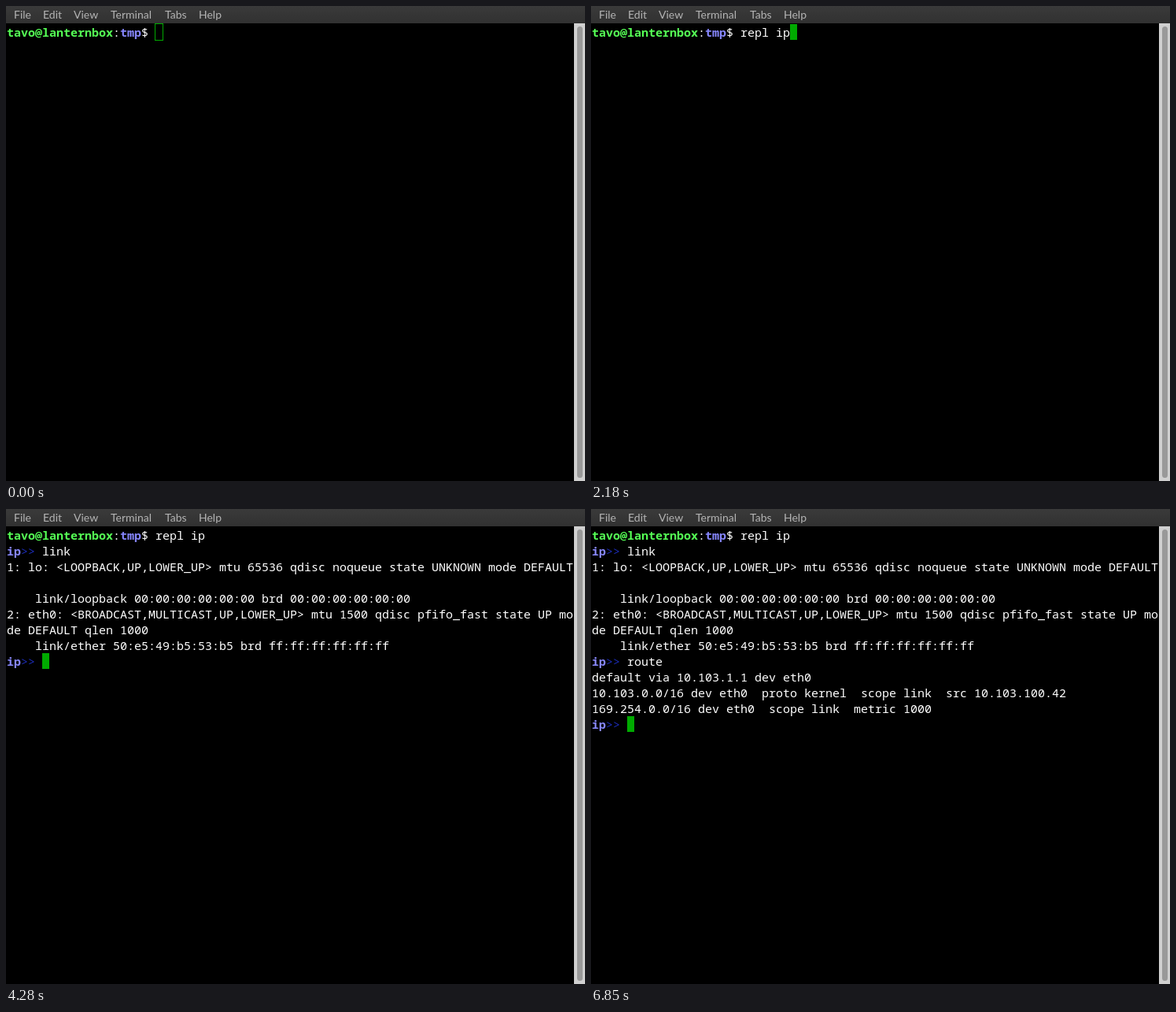
Animation of 736 by 603 pixels, one loop 8 s. Source, as an HTML page:

```html
<!DOCTYPE html>
<html lang="en">
<head>
<meta charset="utf-8">
<title>Terminal session</title>
<style>
  html, body { margin: 0; width: 100%; height: 100%; overflow: hidden; background: #000; }
  svg { display: block; }
  text { white-space: pre; }
  .menu { font: 14px Lato, sans-serif; fill: #b4b4b4; }
  .term { font: 15px "Noto Sans Mono", monospace; fill: #fff; font-variant-ligatures: none; }
  .user { font-weight: bold; fill: #55ff55; }
  .name { font-weight: bold; fill: #8787ff; }
  .arrow { fill: #1c2cb8; }
</style>
</head>
<body>
<svg width="736" height="603" viewBox="0 0 736 603">
  <defs>
    <linearGradient id="bar" x2="0" y2="1">
      <stop stop-color="#3a3a3a"/><stop offset="1" stop-color="#313131"/>
    </linearGradient>
  </defs>
  <rect width="736" height="603"/>
  <rect width="736" height="22" fill="url(#bar)"/>
  <g class="menu">
    <text x="10" y="16">File</text>
    <text x="47" y="16">Edit</text>
    <text x="86" y="16">View</text>
    <text x="133" y="16">Terminal</text>
    <text x="202" y="16">Tabs</text>
    <text x="245" y="16">Help</text>
  </g>
  <rect x="722" y="22" width="14" height="581" fill="#d0d0d0"/>
  <rect x="726" y="26" width="7" height="573" rx="3.5" fill="#999"/>
  <rect id="cursor"/>
  <g id="screen" class="term"></g>
</svg>
<script>
const LOOP = 8000, CELL = 9, ROW = 20, LEFT = 1, TOP = 23;
const NS = "http://www.w3.org/2000/svg";
const cursor = document.getElementById("cursor");
const screen = document.getElementById("screen");

const shell = [["user", "tavo@lanternbox"], ["", ":"], ["name", "tmp"], ["", "$ "]];
const repl = [["name", "ip"], ["arrow", ">>"], ["", " "]];

// Each command: when its prompt shows, key times, Enter time, output
const session = [
  { at: 0, prompt: shell, text: "repl ip",
    keys: [1130, 1200, 1290, 1370, 1570, 1990, 2180], enter: 2660, out: [] },
  { at: 2700, prompt: repl, text: "link",
    keys: [3300, 3510, 3600, 3690], enter: 4280, out: [
      "1: lo: <LOOPBACK,UP,LOWER_UP> mtu 65536 qdisc noqueue state UNKNOWN mode DEFAULT",
      "",
      "    link/loopback 00:00:00:00:00:00 brd 00:00:00:00:00:00",
      "2: eth0: <BROADCAST,MULTICAST,UP,LOWER_UP> mtu 1500 qdisc pfifo_fast state UP mo",
      "de DEFAULT qlen 1000",
      "    link/ether 50:e5:49:b5:53:b5 brd ff:ff:ff:ff:ff:ff"] },
  { at: 4280, prompt: repl, text: "route",
    keys: [6180, 6310, 6390, 6470, 6550], enter: 6850, out: [
      "default via 10.103.1.1 dev eth0",
      "10.103.0.0/16 dev eth0  proto kernel  scope link  src 10.103.100.42",
      "169.254.0.0/16 dev eth0  scope link  metric 1000"] },
  { at: 6850, prompt: repl, text: "", keys: [], enter: Infinity, out: [] }
];

function make(tag, attrs, parent) {
  const el = document.createElementNS(NS, tag);
  set(el, attrs);
  return parent.appendChild(el);
}

function set(el, attrs) {
  for (const k in attrs) el.setAttribute(k, attrs[k]);
}

// Lines of [class, text] runs, plus the cursor cell
function stateAt(t) {
  const lines = [];
  let col = 0, row = 0;
  for (const cmd of session) {
    if (t < cmd.at) break;
    const typed = cmd.text.slice(0, cmd.keys.filter(k => k <= t).length);
    const line = [...cmd.prompt, ["", typed]];
    lines.push(line);
    col = line.reduce((n, run) => n + run[1].length, 0);
    row = lines.length - 1;
    if (t < cmd.enter) break;
    for (const s of cmd.out) lines.push([["", s]]);
    col = 0;
    row = lines.length;
  }
  return { lines, col, row };
}

function drawCursor(col, row, focused) {
  const x = LEFT + col * CELL, y = TOP + row * ROW;
  set(cursor, focused
    ? { x, y, width: CELL, height: ROW, fill: "#00aa00", stroke: "none" }
    : { x: x - 0.5, y: y - 0.5, width: CELL + 1, height: ROW + 1, fill: "none", stroke: "#00aa00" });
}

let shown = "";
function render(t) {
  const { lines, col, row } = stateAt(t);
  drawCursor(col, row, t >= 280);
  const key = JSON.stringify(lines);
  if (key === shown) return;
  shown = key;
  screen.replaceChildren();
  lines.forEach((line, i) => {
    let x = LEFT;
    for (const [style, str] of line) {
      make("text", { x, y: TOP + i * ROW + 16, class: style }, screen).textContent = str;
      x += str.length * CELL;
    }
  });
}

function tick() {
  render(performance.now() % LOOP);
  requestAnimationFrame(tick);
}
tick();
</script>
</body>
</html>
```
